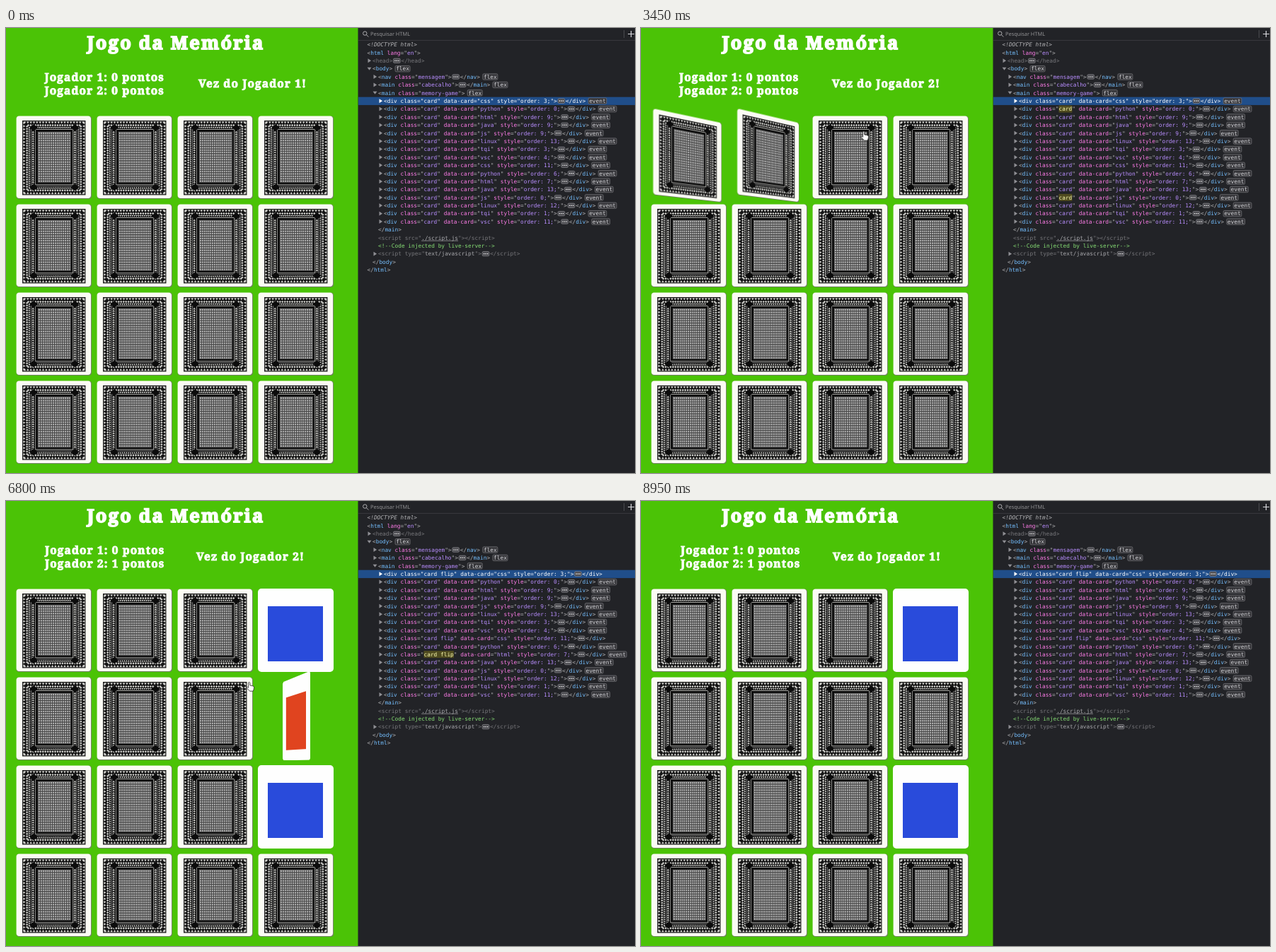
Recreate the animation shown at these times as an HTML page with a canvas. Size 889x630 px, loop 9050 ms.

```html
<!DOCTYPE html>
<html lang="pt">
<head>
<meta charset="utf-8">
<title>Jogo da Memória</title>
<style>
  html, body { margin: 0; width: 100%; height: 100%; overflow: hidden; background: #4bc306; }
  svg, #board { position: absolute; left: 0; top: 0; width: 889px; height: 630px; }
  svg text { text-rendering: geometricPrecision; }
  #board { perspective: 800px; perspective-origin: 239px 370px; }
  .card { position: absolute; width: 106.5px; height: 117.5px; transform-style: preserve-3d; }
  .card > * { position: absolute; left: 0; top: 0; width: 100%; height: 100%; backface-visibility: hidden; }
  .front { background: #fefefe; border-radius: 5px; transform: rotateY(180deg); }
  .front i { position: absolute; }
  .game { font: 900 15.4px "Noto Serif", serif; letter-spacing: 1.15px; fill: #fff; stroke: #fff; stroke-width: .9px; }
  .game .title { font-size: 25.5px; letter-spacing: 2.2px; stroke-width: 1.8px; }
  .code { font: 7.82px "DejaVu Sans Mono", monospace; }
  .p { fill: #b1b1b3; } .t { fill: #75bfff; } .a { fill: #ff7de9; } .v { fill: #b98eff; }
  .d { fill: #77777b; } .l { fill: #a9a9ad; } .c { fill: #86de74; } .w { fill: #fff; }
  .i { fill: #b5b5b8; font-style: italic; } .h { fill: #ffffb4; } .b { fill: #d7d7db; }
</style>
</head>
<body>
<svg viewBox="0 0 889 630">
  <g class="game">
    <text class="title" x="240" y="30" text-anchor="middle">Jogo da Memória</text>
    <text id="score1" y="74.6"></text>
    <text id="score2" y="93.6"></text>
    <text id="turn" y="83.6"></text>
  </g>
  <rect x="497.5" width="391.5" height="630" fill="#222327"/>
  <path d="M498 17.5H889" stroke="#38383d"/>
  <path d="M873.5 3V14" stroke="#4a4a4f"/>
  <path d="M879 8.5h9M883.5 4v9" stroke="#d7d7db" stroke-width="1.2"/>
  <g fill="none" stroke="#b1b1b3"><circle cx="507.3" cy="7.6" r="2.7"/><path d="M509.3 9.6l3 3"/></g>
  <text x="515" y="11.3" fill="#939395" style="font:7.4px 'Noto Sans',sans-serif">Pesquisar HTML</text>
  <rect x="498" y="97.7" width="391" height="11.4" fill="#204e8a"/>
  <g id="fixed" class="code"></g>
  <g id="live" class="code"></g>
</svg>
<div id="board"></div>
<svg viewBox="0 0 889 630">
  <g id="cursor" fill="#fff" stroke="#222" stroke-width=".8" stroke-linejoin="round">
    <path id="arrow" d="M0 0V11l2.6-2.4 1.8 4 1.7-.8-1.8-3.8H8z"/>
    <path id="hand" d="M.6 1q1.2-1.4 2.2.3V5l4 .8q2 .6 1.8 2.4l-.6 3-.8 2H2.6L-1.8 8.6q-.4-1.6 1.2-1.2l1.2 1z"/>
  </g>
</svg>
<script>
const LOOP = 9050, STEP = 50, FLIP = 800;
const CHAR = 4.708, LINE = 11.39;
const $ = id => document.getElementById(id);
const clamp = v => Math.max(0, Math.min(1, v));

// [name, flex order], in document order
const cards = [['css', 3], ['python', 0], ['html', 9], ['java', 9], ['js', 9], ['linux', 13], ['tqi', 3], ['vsc', 4],
  ['css', 11], ['python', 6], ['html', 7], ['java', 13], ['js', 0], ['linux', 12], ['tqi', 1], ['vsc', 11]];
// card index: [opened, closed]
const flips = { 1: [1350, 3065], 12: [2245, 3065], 0: [4125], 8: [5025], 10: [6545, 8080], 14: [7195, 8080] };
const MATCH = 5025;
// colour, size, top, corner radius
const marks = { css: ['#294bdb', 78, 25, 0], html: ['#e0441f', 78, 25, 0], js: ['#f0db4f', 78, 20, 0],
  python: ['#1a78a3', 84, 16.5, 50], tqi: ['#1f4b9c', 46, 36, 0] };
// time, score x, turn x, player, points of the second player
const phases = [[0, 54.5, 272, 1, 0], [3065, 54, 270, 2, 0], [5025, 55, 269, 2, 1], [8080, 56, 271, 1, 1]];
const path = [[600, 94, 12], [750, 94, 36], [900, 94, 36], [1200, 84, 149], [1850, 84, 149], [2200, 176, 188],
  [2900, 176, 188], [3250, 285, 98], [3450, 313, 146], [4000, 405, 190], [4200, 405, 200], [4550, 407, 333],
  [4900, 408, 430], [5600, 408, 430], [6200, 408, 320], [6550, 408, 315], [6800, 342, 256], [7100, 300, 175],
  [7550, 300, 175], [7950, 180, 32]];

// CSS "ease" timing
function ease(x) {
  x = clamp(x);
  let lo = 0, hi = 1, u = x;
  const bez = (s, a, b) => 3 * s * (1 - s) ** 2 * a + 3 * s * s * (1 - s) * b + s ** 3;
  for (let i = 0; i < 20; i++) {
    u = (lo + hi) / 2;
    if (bez(u, .25, .25) < x) lo = u; else hi = u;
  }
  return bez(u, .1, 1);
}

function paintBack(canvas) {
  canvas.width = 213;
  canvas.height = 235;
  const g = canvas.getContext('2d');
  g.scale(2, 2);
  const box = (color, x, y, w, h) => { g.fillStyle = color; g.fillRect(x, y, w, h); };
  const round = (color, x, y, w, h) => { g.fillStyle = color; g.beginPath(); g.roundRect(x, y, w, h, 4); g.fill(); };
  const shape = (color, ...pts) => {
    g.fillStyle = color;
    g.beginPath();
    pts.forEach(([x, y]) => g.lineTo(x, y));
    g.fill();
  };
  // repeats a motif along a rectangle, +y pointing inwards
  const ring = (inset, step, draw) => {
    const w = 89 - 2 * inset, h = 105 - 2 * inset;
    for (let side = 0; side < 4; side++) {
      const len = side % 2 ? h : w, depth = side % 2 ? w : h, n = Math.round(len / step);
      g.save();
      g.translate(53.5, 59.5);
      g.rotate(side * Math.PI / 2);
      for (let i = 0; i < n; i++) {
        g.save();
        g.translate((i + .5) * len / n - len / 2, -depth / 2);
        draw();
        g.restore();
      }
      g.restore();
    }
  };
  const tri = (r, h) => shape('#d2d2ce', [-r, 0], [0, h], [r, 0]);
  const dia = r => shape('#d2d2ce', [-r, 0], [0, -r], [r, 0], [0, r]);

  round('#6f8060', .5, .5, 106, 117);
  round('#fbfbf4', .5, .5, 105, 116);
  box('#161616', 9, 7, 89, 105);
  ring(1.2, 4.4, () => tri(1.8, 3.2));
  ring(6.6, 3.4, () => dia(1.6));
  ring(9, 2.8, () => tri(1.2, 2.4));
  g.strokeStyle = '#aaa';
  g.lineWidth = .6;
  g.strokeRect(21.5, 19.5, 64, 80);
  for (let y = 23; y < 97; y += 3.2)
    for (const x of [24, 83]) shape('#d2d2ce', [x - 1.7, y + 1.2], [x, y - 1.4], [x + 1.7, y + 1.2]);
  box('#b8b8b4', 27.2, 19.2, 53.6, 78.6);
  box('#0c0c0c', 28, 20, 52, 77);
  box('#808080', 30.8, 22.8, 46.4, 71.4);
  box('#484848', 31.4, 23.4, 45.2, 70.2);
  for (let y = 0; y < 21; y++)
    for (let x = 0; x < 16; x++) box('#b0b0b0', 32 + x * 2.82, 24 + y * 3.36, 1.9, 2.2);
  for (const x of [25, 83]) for (const y of [17, 101])
    shape('#0c0c0c', [x - 6, y], [x, y - 5], [x + 6, y], [x, y + 5]);
}

// cards sit on the table sorted by their flex order
const els = [];
cards.map((c, i) => i).sort((a, b) => cards[a][1] - cards[b][1]).forEach((id, slot) => {
  const el = document.createElement('div'), back = document.createElement('canvas');
  el.className = 'card';
  el.style.left = 14 + slot % 4 * 114 + 'px';
  el.style.top = 124 + Math.floor(slot / 4) * 125.1 + 'px';
  const [color, size, top, radius] = marks[cards[id][0]] || ['#fff', 0, 0, 0];
  el.innerHTML = `<div class="front"><i style="left:${53.25 - size / 2}px;top:${top}px;width:${size}px;` +
    `height:${size}px;background:${color};border-radius:${radius}%"></i></div>`;
  paintBack(back);
  el.append(back);
  $('board').append(el);
  els[id] = el;
});

const esc = s => s.replace(/</g, '&lt;').replace(/>/g, '&gt;');
const DOTS = ['', 'dots'], FLEX = ['flex', 'badge'], EVENT = ['event', 'badge'];
const attr = (k, v, cls = 'v') => [[' ', 'p'], [k, 'a'], ['="', 'p'], [v, cls], ['"', 'p']];
const open = (name, ...attrs) => [['<', 'p'], [name, 't'], ...attrs.flat(), ['>', 'p']];
const close = name => [['</', 'p'], [name, 't'], ['>', 'p']];
const dim = parts => parts.map(([s, c]) => [s, 'ptav'.includes(c) ? 'd' : c]);

// one line of the inspector; fold is 1 for closed, 2 for open
function row(n, x, parts, fold = 0, picked = false, flash = 0) {
  const y = 23.5 + n * LINE, base = y + 2.8;
  let out = '';
  const put = (s, cls, at) => `<text x="${at}" y="${base}" class="${cls}">${esc(s)}</text>`;
  if (fold) out += `<path fill="${picked ? '#fff' : '#8f8f94'}" d="` +
    (fold === 1 ? `M${x - 6.5} ${y - 3}l4.6 3-4.6 3z` : `M${x - 7.5} ${y - 2}h6l-3 4z`) + '"/>';
  for (const [s, cls] of parts) {
    const w = s.length * CHAR;
    if (cls === 'dots') {
      out += `<rect x="${x + 1.2}" y="${y - 3.2}" width="9.8" height="6.4" rx="1.6" fill="#4a4a4f" stroke="#98989c" stroke-width=".6"/>` +
        `<path d="M${x + 3} ${y}h6.4" stroke="#fff" stroke-width="1.3" stroke-dasharray="1.3 1.2"/>`;
      x += 12.2;
    } else if (cls === 'badge') {
      out += `<rect x="${x + 3.8}" y="${y - 4.2}" width="${w + 2.2}" height="8.4" rx="1.5" fill="#343438" stroke="#7b7b80" stroke-width=".7"/>` +
        put(s, 'b', x + 4.9);
      x += w + 6;
    } else {
      if (cls === 'h') out += `<rect x="${x}" y="${y - 5}" width="${w}" height="10" fill="#4f4b1f" opacity="${flash}"/>`;
      if (s !== ' ') out += put(s, picked ? 'w' : cls === 'h' && flash < .5 ? 'v' : cls, x);
      x += w;
    }
  }
  return out;
}

$('fixed').innerHTML = [
  row(0, 510.5, [['<!DOCTYPE html>', 'i']]),
  row(1, 510.5, open('html', attr('lang', 'en'))),
  row(2, 518, dim([...open('head'), DOTS, ...close('head')]), 1),
  row(3, 518, [...open('body'), FLEX], 2),
  row(4, 526, [...open('nav', attr('class', 'mensagem')), DOTS, ...close('nav'), FLEX], 1),
  row(5, 526, [...open('main', attr('class', 'cabecalho')), DOTS, ...close('main'), FLEX], 1),
  row(6, 526, [...open('main', attr('class', 'memory-game')), FLEX], 2),
  row(23, 526, close('main')),
  row(24, 526, dim([...open('script', attr('src', './script.js', 'l')), ...close('script')])),
  `<path d="M587.2 301.2h51.8" stroke="#a9a9ad" stroke-width=".7"/>`,
  row(25, 526, [['<!--Code injected by live-server-->', 'c']]),
  row(26, 526, dim([...open('script', attr('type', 'text/javascript', 'l')), DOTS, ...close('script')]), 1),
  row(27, 518, close('body')),
  row(28, 510.5, close('html'))
].join('');

function cardState(id, t) {
  const [a, b] = flips[id] || [Infinity];
  if (t < a) return { turn: 0, up: false, flash: 0 };
  const up = !(t >= b), age = t - (up ? a : b), k = ease(age / FLIP);
  return { turn: 180 * (up ? k : 1 - k), up, flash: clamp((880 - age) / 430) };
}

function cardRow(id, s, t) {
  const [name, order] = cards[id], picked = id === 0;
  const cls = s.flash > 0 && !picked ? 'h' : 'v';
  const parts = [...open('div', attr('class', s.up ? 'card flip' : 'card', cls),
    attr('data-card', name), attr('style', `order: ${order};`)), DOTS, ...close('div')];
  if (name !== 'css' || t < MATCH) parts.push(EVENT);
  return row(7 + id, 534, parts, 1, picked, s.flash);
}

function moveCursor(t) {
  const last = path[path.length - 1];
  const shown = t >= path[0][0] && t < last[0];
  $('cursor').style.display = shown ? '' : 'none';
  if (!shown) return;
  const i = path.findIndex(p => p[0] > t), [t0, x0, y0] = path[i - 1], [t1, x1, y1] = path[i];
  const k = (t - t0) / (t1 - t0), e = k * k * (3 - 2 * k);
  const x = x0 + (x1 - x0) * e, y = y0 + (y1 - y0) * e;
  const over = x > 14 && y > 124 && x < 463 && y < 617 && (x - 14) % 114 < 106.5 && (y - 124) % 125.1 < 117.5;
  $('cursor').setAttribute('transform', `translate(${x} ${y})`);
  $('hand').style.display = over ? '' : 'none';
  $('arrow').style.display = over ? 'none' : '';
}

function draw(t) {
  // the picture stalls briefly twice
  for (const [from, to] of [[5150, 5300], [8150, 8300]]) if (t > from && t < to) t = from;
  const [, sx, tx, player, points] = phases.filter(p => p[0] <= t).pop();
  const say = (id, x, s) => { $(id).setAttribute('x', x); $(id).textContent = s; };
  say('score1', sx, 'Jogador 1: 0 pontos');
  say('score2', sx, `Jogador 2: ${points} pontos`);
  say('turn', tx, `Vez do Jogador ${player}!`);
  let rows = '';
  els.forEach((el, id) => {
    const s = cardState(id, t);
    el.style.transform = `rotateY(${s.turn}deg)`;
    rows += cardRow(id, s, t);
  });
  $('live').innerHTML = rows;
  moveCursor(t);
}

const start = performance.now();
let shownAt = -1;
function tick() {
  const t = Math.floor((performance.now() - start) % LOOP / STEP) * STEP;
  if (t !== shownAt) draw(shownAt = t);
  requestAnimationFrame(tick);
}
tick();
</script>
</body>
</html>
```
